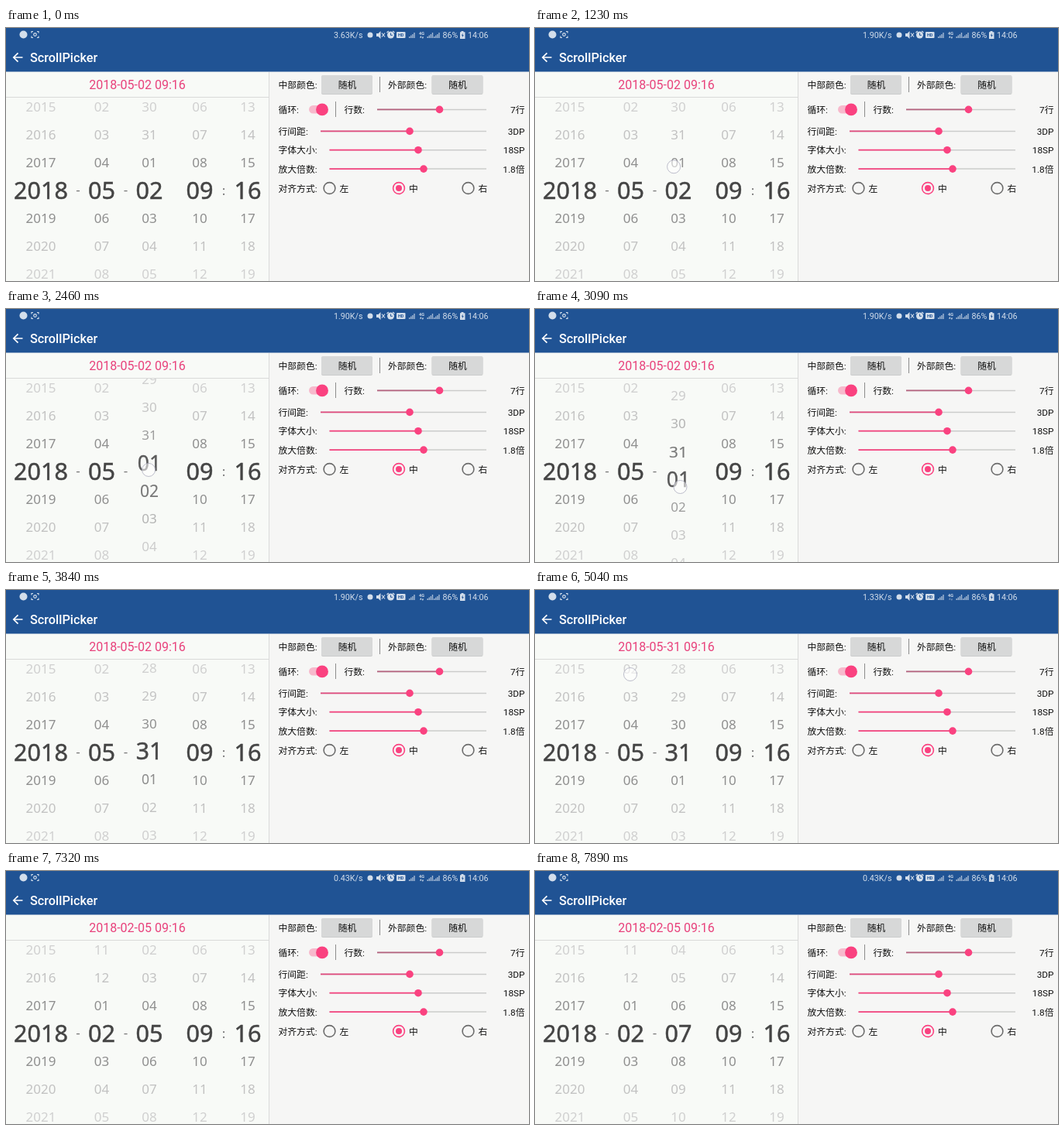
Recreate the animation shown at these times as an HTML page. Size 675 by 327 pixels, loop 8 s.

```html
<!DOCTYPE html>
<html lang="zh">
<head>
<meta charset="utf-8">
<title>ScrollPicker</title>
<style>
  html, body { margin: 0; width: 100%; height: 100%; overflow: hidden; background: #f6f6f5; }
  svg { display: block; width: 675px; height: 327px; }
  text { font-family: Roboto, "Noto Sans CJK SC", "Noto Sans CJK", sans-serif; font-size: 11.8px; fill: #111; }
  .mid { text-anchor: middle; }
  .end { text-anchor: end; }
  .strong { font-weight: 500; }
  .status text { font-size: 10.7px; fill: #d3deeb; }
  .status .tiny { font-size: 5.5px; font-weight: 700; }
  .icon { fill: #d3deeb; }
  .line { fill: none; stroke: #d3deeb; stroke-width: 1.2; }
  .faint { opacity: .75; }
  .title { font-size: 16.3px; font-weight: 500; fill: #fff; }
  .date { font-size: 16px; fill: #e8417b; }
  .wheel, .sep { font-family: "Noto Sans", "Open Sans", sans-serif; }
  .sep { font-size: 17px; fill: #777; }
</style>
</head>
<body>
<svg id="stage" viewBox="0 0 675 327">
  <defs>
    <clipPath id="window"><rect y="90" width="339" height="237"/></clipPath>
    <g id="bars"><path d="M0 8V6h1.4v2zM2.1 8V4.500h1.400V8zM4.200 8V3h1.400v5zM6.300 8V1h1.400v7z"/></g>
  </defs>
  <rect width="675" height="327" fill="#f6f6f5"/>
  <rect width="339" height="327" fill="#f8faf7"/>
  <rect width="675" height="56.500" fill="#205394"/>

  <g class="status">
    <circle class="icon" cx="22.5" cy="8.5" r="5"/>
    <path class="line" d="M33 6.500V4.500h2M40 4.500h2v2M42 10.500v2h-2M35 12.500h-2v-2"/>
    <circle class="line" cx="37.500" cy="8.500" r="1.800"/>
    <text id="speed" x="423" y="13"></text>
    <circle class="icon" cx="470" cy="9" r="3.5"/>
    <path class="icon" d="M478 7h2.500l3-3v10l-3-3H478z"/>
    <path class="line" d="M485 6.500l4 5M489 6.500l-4 5"/>
    <circle class="icon" cx="496.500" cy="9" r="4.500"/>
    <path d="M496.500 6.500V9.300h2.300" fill="none" stroke="#205394"/>
    <path class="line" d="M491.500 6l2.300-2M499.200 4l2.300 2"/>
    <rect class="icon" x="504" y="5" width="11.500" height="8" rx="1"/>
    <text class="tiny mid" x="509.700" y="11" style="fill:#205394">HD</text>
    <use class="icon faint" href="#bars" x="520" y="5"/>
    <text class="tiny mid" x="536.500" y="8.500">4G</text>
    <path id="arrows" class="icon" d="M534 12.500l1.300-2.500 1.200 2.500zM536.700 11.500h2.400l-1.200 2.500z"/>
    <use class="icon faint" href="#bars" x="543.500" y="5"/>
    <use class="icon faint" href="#bars" x="552" y="5"/>
    <text x="563.500" y="13">86%</text>
    <path class="icon" d="M587.500 4h3v1.200h2V14h-6.500V5.200h1.500z"/>
    <path d="M589.800 6.500l-2 3.300h1.300l-.5 2.700 2.200-3.500h-1.400z" fill="#205394"/>
    <text x="596" y="13">14:06</text>
  </g>

  <path d="M21.500 38H10M15.500 32.300L9.800 38l5.700 5.700" fill="none" stroke="#fff" stroke-width="1.700"/>
  <text class="title" x="31" y="43.700">ScrollPicker</text>

  <path d="M0 89.500H339.500M339.500 57V327" fill="none" stroke="#d9dad9"/>
  <text id="date" class="date mid" x="169.500" y="79"></text>
  <g clip-path="url(#window)">
    <g id="wheels"></g>
    <text class="sep mid" x="93" y="215">-</text>
    <text class="sep mid" x="154.500" y="215">-</text>
    <text class="sep mid" x="281" y="215.500">:</text>
  </g>
  <circle id="touch" r="8.500" fill="#fff" fill-opacity=".55" stroke="#a9a9bb" stroke-opacity=".75"/>

  <g id="settings">
    <path d="M482.500 63V83M425.500 95V115" stroke="#8c8c8c"/>
    <rect x="391" y="100" width="24" height="10.500" rx="5.200" fill="#f7b9cc"/>
    <circle cx="408" cy="105.400" r="7.900" fill="#fa4280"/>
  </g>
</svg>
<script>
const LOOP = 8000, STEP = 30, ROW = 36, CENTER = 210, TEXT = 17, ZOOM = .8;
const $ = id => document.getElementById(id);
const pad = n => String(n).padStart(2, '0');
const wrap = (n, size, first) => ((n - first) % size + size) % size + first;
const mix = (a, b, p) => a + (b - a) * p;

function add(parent, tag, attrs, text = '') {
  const node = document.createElementNS('http://www.w3.org/2000/svg', tag);
  for (const key in attrs) node.setAttribute(key, attrs[key]);
  node.textContent = text;
  return parent.appendChild(node);
}

// Settings panel
const panel = $('settings');
const label = (x, y, text, cls = '') => add(panel, 'text', { x, y: y + 4.8, class: cls }, text);

function button(x, text) {
  add(panel, 'rect', { x, y: 61.5, width: 66, height: 24.5, rx: 2, fill: '#cbcccc' });
  add(panel, 'rect', { x, y: 61, width: 66, height: 24, rx: 2, fill: '#d7d8d8' });
  label(x + 33.5, 73, text, 'mid strong');
}

function slider(y, from, thumb, color, value) {
  const lineY = y + .4;
  add(panel, 'path', { d: `M${from} ${lineY}H620`, stroke: '#cbcccb', 'stroke-width': 1.5 });
  add(panel, 'path', { d: `M${from} ${lineY}H${thumb}`, stroke: color, 'stroke-width': 1.7 });
  add(panel, 'circle', { cx: thumb, cy: lineY, r: 4.8, fill: '#fa4280' });
  label(669.5, y, value, 'end');
}

function radio(x, text, on) {
  const color = on ? '#fa4280' : '#6c6c6c';
  add(panel, 'circle', { cx: x, cy: 207, r: 7.4, fill: 'none', stroke: color, 'stroke-width': 1.6 });
  if (on) add(panel, 'circle', { cx: x, cy: 207, r: 4, fill: color });
  label(x + 13, 207, text);
}

label(351.5, 73, '中部颜色:');
label(493, 73, '外部颜色:');
button(407, '随机');
button(549.5, '随机');
label(351.5, 105, '循环:');
label(436.5, 105, '行数:');
label(351.5, 133, '行间距:');
label(351.5, 157.3, '字体大小:');
label(351.5, 181.7, '放大倍数:');
label(351.5, 207, '对齐方式:');
slider(105, 479, 559.5, '#b5637f', '7行');
slider(133, 406, 521, '#e04a7d', '3DP');
slider(157.3, 417.5, 532, '#f5437f', '18SP');
slider(181.7, 417.5, 539, '#f5437f', '1.8倍');
radio(417.5, '左');
radio(507, '中', true);
radio(596.5, '右');

// Motion: keys are [time, value, easing into this key]
const easeIn = p => p * p, easeOut = p => p * (2 - p), hold = () => 0;

function track(keys, t) {
  const i = keys.findIndex(key => key[0] > t);
  if (i < 0) return keys[keys.length - 1][1];
  if (i === 0) return keys[0][1];
  const [t0, a] = keys[i - 1], [t1, b, ease = p => p] = keys[i];
  return mix(a, b, ease((t - t0) / (t1 - t0)));
}

const latest = (list, t) => list.filter(item => item[0] <= t).pop()[1];

const monthKeys = [[5040, 5], [5550, 2, easeOut]];
const dayKeys = [
  [1020, 2], [1890, 1.82, easeIn], [3090, .72], [3560, .2], [4050, 0, easeOut],
  [5550, 3, hold], [6090, 3], [6150, 3.35], [6600, 3.35], [6900, 5, easeOut],
  [7410, 5], [7890, 7, easeOut]
];
const touches = [
  { x: [[510, 178.5], [1020, 178.5], [1890, 181], [3090, 187.5]],
    y: [[1020, 176.5], [1890, 188], [3090, 230], [3560, 246]], from: 510, to: 3560 },
  { x: [[0, 123]], y: [[5040, 109], [5190, 168]], from: 5040, to: 5190 },
  { x: [[0, 185]], y: [[6090, 262], [6150, 244], [6600, 244], [6720, 214]], from: 6090, to: 6720 },
  { x: [[0, 185]], y: [[7410, 256], [7560, 208]], from: 7410, to: 7560 }
];
const speeds = [[0, '3.63'], [1020, '1.90'], [3900, '1.33'], [7320, '0.43']];
const dates = [[0, '05-02'], [4050, '05-31'], [5550, '02-03'], [7320, '02-05']];

const wheels = [
  { x: 45, pos: () => 2018, name: String },
  { x: 123.5, pos: t => track(monthKeys, t), name: n => pad(wrap(n, 12, 1)) },
  { x: 185, pos: t => track(dayKeys, t), name: (n, t) => pad(wrap(n, t < 5550 ? 31 : 28, 1)) },
  { x: 250, pos: () => 9, name: pad },
  { x: 312, pos: () => 16, name: pad }
];
for (const wheel of wheels) {
  wheel.rows = Array.from({ length: 9 }, () => add($('wheels'), 'text', { x: wheel.x, class: 'wheel mid' }));
}

const shades = [[0, 68], [1, 142], [2, 194], [3, 208]];

function drawWheel(wheel, t) {
  const pos = wheel.pos(t), middle = Math.round(pos);
  wheel.rows.forEach((row, i) => {
    const value = middle + i - 4, shift = value - pos, far = Math.abs(shift);
    const size = TEXT * (1 + ZOOM * Math.max(0, 1 - far));
    const shade = Math.round(track(shades, far));
    const color = `rgb(${shade},${shade},${shade})`;
    row.textContent = wheel.name(value, t);
    row.setAttribute('y', CENTER + shift * ROW + size * .357);
    row.style.fontSize = size + 'px';
    row.style.fill = row.style.stroke = color;
    row.style.strokeWidth = .5 * Math.max(0, 1 - far);
  });
}

function draw(t) {
  wheels.forEach(wheel => drawWheel(wheel, t));
  $('speed').textContent = latest(speeds, t) + 'K/s';
  $('date').textContent = `2018-${latest(dates, t)} 09:16`;
  $('arrows').style.opacity = t >= 4440 && t < 6090 ? .5 : 1;
  const touch = touches.find(({ from, to }) => t >= from && t < to);
  $('touch').style.display = touch ? '' : 'none';
  if (touch) {
    $('touch').setAttribute('cx', track(touch.x, t));
    $('touch').setAttribute('cy', track(touch.y, t));
  }
}

const start = performance.now();
function tick() {
  const t = (performance.now() - start) % LOOP;
  draw(Math.floor(t / STEP) * STEP);
  requestAnimationFrame(tick);
}
tick();
</script>
</body>
</html>
```
